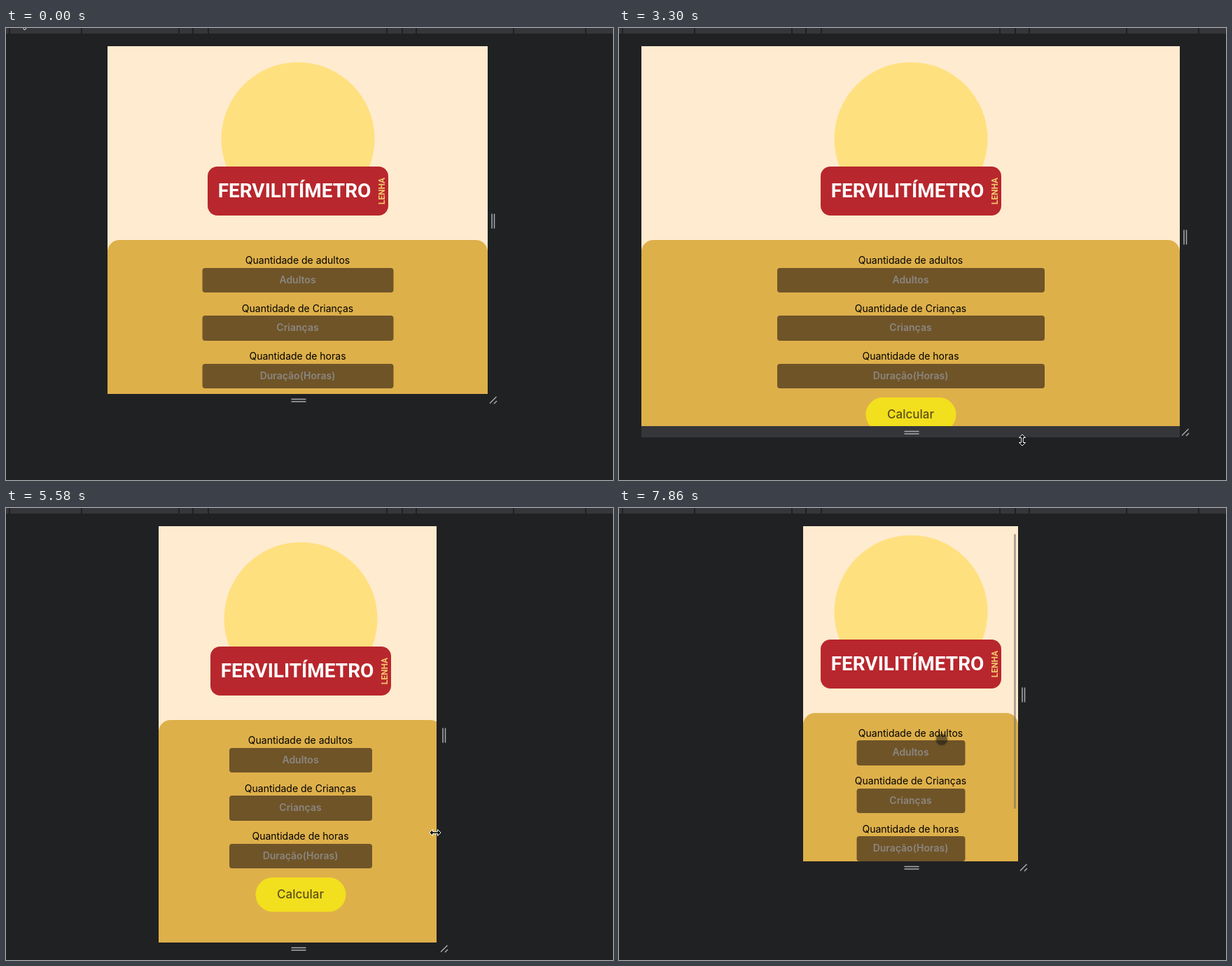
These frames come from a looping animation (867x646 px, 8 s). An HTML page:

```html
<!DOCTYPE html>
<html lang="pt">
<head>
<meta charset="utf-8">
<title>Responsive preview</title>
<style>
  html, body { margin: 0; width: 100%; height: 100%; overflow: hidden; background: #202123; }
  #stage { position: relative; width: 867px; height: 646px; overflow: hidden; background: #202123;
    font-family: Inter, sans-serif; }
  #stage div, #stage svg { position: absolute; box-sizing: border-box; }
  #bar { left: 0; top: 0; width: 867px; height: 8px; background: #35363a; }
  #bar div { top: 0; width: 2px; height: 8px; background: #202123; }
  #view { top: 26px; overflow: hidden; background: #ffebcf; }
  #page { left: 0; top: 0; height: 595px; background: #ffebcf; }
  #panel { left: 0; right: 0; top: 277px; bottom: 0; border-radius: 17px 17px 0 0; background: #deb04a; }
  #page .mid { left: 50%; transform: translateX(-50%); text-align: center; white-space: nowrap; }
  #disc { top: 23px; width: 219px; height: 219px; border-radius: 50%; background: #ffe07f; }
  #plate { top: 172px; width: 258px; height: 70px; border-radius: 14px; background: #b8272d;
    color: #fff; font: bold 28px/70px Roboto, sans-serif; }
  #name { left: 14px; width: 221px; text-align: center; }
  #tag { left: 228px; top: 25px; width: 42px; height: 20px; font-size: 12px; line-height: 20px;
    color: #f3c66c; transform: rotate(-90deg); }
  .label { font-size: 14px; line-height: 20px; color: #000; }
  .field { height: 35.5px; border-radius: 4px; background: #6f5428; color: #8b8680;
    font-size: 14px; font-weight: 600; line-height: 34px; }
  #button { top: 502px; width: 129px; height: 49px; border-radius: 25px; background: #f2df1e;
    color: #5d5117; font-size: 17px; font-weight: 500; line-height: 48px; }
  #thumb { right: 3px; width: 3px; height: 393px; border-radius: 2px; background: rgba(120, 115, 105, .6); }
  .strip { background: #35363a; }
  #side { top: 26px; width: 16px; }
  #foot { height: 16px; }
  .grip { width: 22px; height: 22px; overflow: visible; stroke: #a9abae; stroke-width: 1.5; fill: none; }
  #touch { width: 20px; height: 20px; margin: -10px; border-radius: 50%;
    background: radial-gradient(closest-side, rgba(20, 20, 20, .54) 70%, rgba(20, 20, 20, .25) 82%, transparent); }
  .cursor { width: 1px; height: 1px; overflow: visible; fill: #000; stroke: #fff; stroke-width: 1; }
</style>
</head>
<body>
<div id="stage">
  <div id="bar"></div>
  <div id="view">
    <div id="page">
      <div id="disc" class="mid"></div>
      <div id="plate" class="mid"><div id="name">FERVILITÍMETRO</div><div id="tag">LENHA</div></div>
      <div id="panel"></div>
      <div id="button" class="mid">Calcular</div>
    </div>
    <div id="thumb"></div>
  </div>
  <div id="side" class="strip"></div>
  <div id="foot" class="strip"></div>
  <svg id="gripX" class="grip"><path d="M9 .5v21M12.5 .5v21"/></svg>
  <svg id="gripY" class="grip"><path d="M.5 9.5h21M.5 13h21"/></svg>
  <svg id="corner" class="grip"><path d="M6 15.5L15.5 6M12 16L16 12"/></svg>
  <div id="touch"></div>
  <svg id="arrow" class="cursor"><path d="M0 0V15L3.5 12L6 17.5L8.5 16.5L6 11H11Z"/></svg>
  <svg id="resize" class="cursor"><path d="M-8 0L-3.5-4.5V-1.3H3.5V-4.5L8 0L3.5 4.5V1.3H-3.5V4.5Z"/></svg>
</div>
<script>
const $ = id => document.getElementById(id);
const LOOP = 8000, STEP = 60, LAST = 7860, TOP = 26, SPAN = 833;

// Eased travel through moves of the form [begin, end, goal].
function travel(t, from, moves) {
  return moves.reduce((value, [begin, end, goal]) => {
    const p = Math.min(1, Math.max(0, (t - begin) / (end - begin)));
    return value + (goal - value) * p * p * (3 - 2 * p);
  }, from);
}

const right = t => travel(t, 688, [[1440, 2280, 801], [4470, 5460, 618], [5470, 6120, 569.5]]);
const bottom = t => travel(t, 523, [[3060, 3560, 621], [6480, 7380, 505]]);
const scroll = t => travel(t, 0, [[7680, LAST, 10.5]]);
const overhang = t => travel(t, 0, [[5460, 5580, 8], [5580, 5700, 0]]);

const path = [
  [150, 840, 672, 522], [840, 960, 690, 509], [960, 1320, 697, 502],
  [1400, 2280, 809, 496], [2580, 3000, 576, 536], [3000, 3560, 576, 632],
  [3840, 4320, 808, 472], [4380, 5460, 613, 464], [5580, 5940, 578, 464],
  [5940, 6300, 456, 605], [6300, 6480, 440, 631], [6480, 7380, 448, 514],
  [7380, LAST, 461, 331]];
const pointX = t => travel(t, 20, path.map(([a, b, x]) => [a, b, x]));
const pointY = t => travel(t, -15, path.map(([a, b, , y]) => [a, b, y]));

const within = (t, ...spans) => spans.some(([a, b]) => t >= a && t < b);
const show = (id, on) => { $(id).style.display = on ? 'block' : 'none'; };
function place(id, box) {
  for (const key in box) $(id).style[key] = box[key] + 'px';
}
function add(parent, className, text, top) {
  const el = document.createElement('div');
  el.className = className;
  el.textContent = text;
  el.style.top = top + 'px';
  $(parent).append(el);
  return el;
}

for (const x of [4, 107, 246, 266, 288])
  for (const left of [x, SPAN - 2 - x]) add('bar', '', '', 0).style.left = left + 'px';

const fields = [['Quantidade de adultos', 'Adultos'], ['Quantidade de Crianças', 'Crianças'],
  ['Quantidade de horas', 'Duração(Horas)']].map(([label, hint], i) => {
  add('page', 'label mid', label, 296 + i * 68.5);
  return add('page', 'field mid', hint, 316.5 + i * 68.5);
});

function draw(t) {
  const r = Math.ceil(right(t)), l = SPAN - r, w = r - l;
  const b = Math.round(bottom(t)), y = scroll(t);
  const pageW = w + overhang(t);
  const edge = Math.max(r, Math.ceil(right(t - STEP))); // the frame trails a shrinking view
  place('view', { left: l, width: w, height: b - TOP });
  place('page', { width: pageW, top: -y });
  for (const f of fields) f.style.width = Math.min(382, Math.round(pageW / 2 + 1)) + 'px';
  show('thumb', y > 0);
  place('thumb', { top: 2 + y * .82 });

  show('side', within(t, [1560, 2580], [4560, 5400]));
  show('foot', within(t, [2940, 3840], [6480, 7440]));
  place('side', { left: edge, height: b - TOP });
  place('foot', { left: l, top: b, width: w });
  place('gripX', { left: edge - 3, top: (TOP + b) / 2 - 10 });
  place('gripY', { left: 406.5, top: b - 2 });
  place('corner', { left: edge - 3, top: b - 2 });

  const px = pointX(t), py = pointY(t);
  const ew = within(t, [960, 2580], [4320, 6000]);
  const ns = within(t, [2940, 3840], [6420, 7440]);
  const inside = px > l && px < r && py > TOP && py < b;
  const kind = ew || ns ? 'resize' : inside ? 'touch' : 'arrow';
  for (const id of ['resize', 'touch', 'arrow']) show(id, id === kind);
  place(kind, { left: px, top: py });
  $('resize').firstChild.setAttribute('transform', ns ? 'rotate(90)' : '');
}

const start = performance.now();
function tick() {
  const t = (performance.now() - start) % LOOP;
  draw(Math.min(LAST, Math.floor(t / STEP) * STEP));
  requestAnimationFrame(tick);
}
tick();
</script>
</body>
</html>
```
